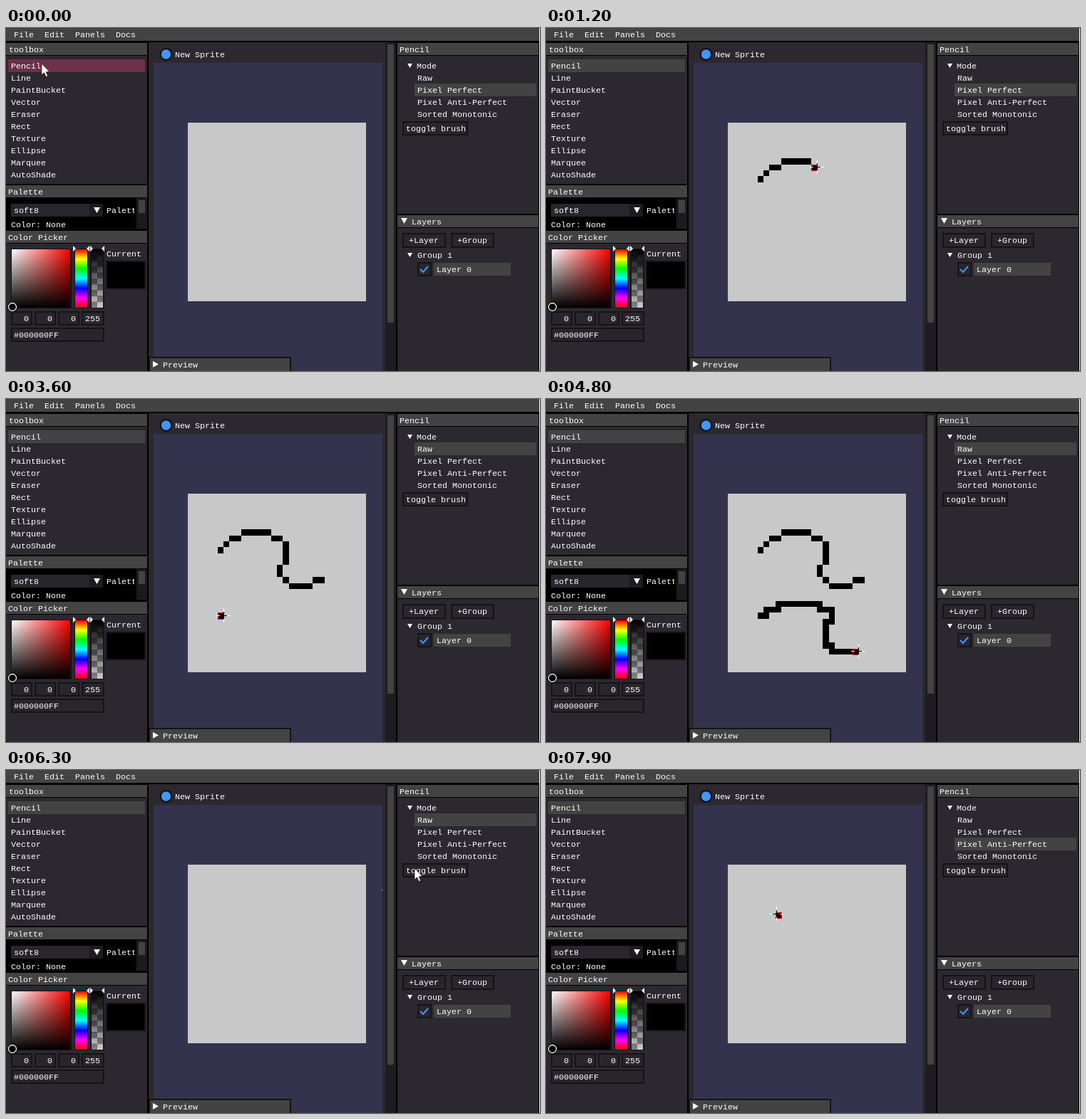
Animation, 749 px wide and 482 px high, one loop 8000 ms. Source, as an HTML page with a canvas:

```html
<!DOCTYPE html>
<html lang="en">
<head>
<meta charset="utf-8">
<title>Sprite editor</title>
<style>
html, body { margin: 0; width: 749px; height: 482px; overflow: hidden; background: #000; }
canvas { display: block; }
</style>
</head>
<body>
<canvas id="stage" width="749" height="482"></canvas>
<script>
const ctx = document.getElementById('stage').getContext('2d');
const LOOP = 8000, STEP = 100;
const PANEL = '#2b282f', BAR = '#434343', HOVER = '#6d3048', EDGE = '#151317', WHITE = '#fff';
const VIEW = { x: 207, y: 49, w: 321, h: 433 };
const SHEET = { x: 255, y: 133, w: 250, h: 251, n: 30 };
const TOOLS = ['Pencil', 'Line', 'PaintBucket', 'Vector', 'Eraser', 'Rect', 'Texture', 'Ellipse', 'Marquee', 'AutoShade'];
const MODES = ['Raw', 'Pixel Perfect', 'Pixel Anti-Perfect', 'Sorted Monotonic'];

// Free pointer moves: time, x, y. While a stroke is drawn the pointer follows it.
const POINTER = [
  [100, 50, 50], [400, 262, 170], [600, 341, 217], [800, 300, 212],
  [1800, 438, 256], [1900, 438, 256], [2300, 580, 122], [2400, 587, 110], [2600, 587, 110], [2700, 588, 68],
  [2800, 588, 68], [3000, 520, 150], [3300, 325, 334], [3500, 295, 315],
  [5500, 486, 330], [5900, 524, 213], [6000, 524, 213], [6200, 537, 168], [6300, 573, 138],
  [6500, 592, 110], [6900, 594, 104], [7300, 440, 165], [7600, 335, 202], [7900, 323, 202]
];

// Corner cells of each stroke
const SMOOTH = walk([[5, 9], [7, 7], [8, 7], [9, 6], [13, 6], [14, 7], [15, 7], [16, 8], [16, 11], [15, 12],
  [15, 13], [17, 15], [20, 15], [21, 14], [22, 14]]);
const STEPPED = walk([[5, 20], [6, 20], [6, 19], [8, 19], [8, 18], [15, 18], [15, 19], [17, 19], [17, 21], [16, 21],
  [16, 25], [17, 25], [17, 26], [24, 26], [24, 25], [25, 25], [25, 24], [27, 24], [27, 23]]);

// count: time, number of cells drawn
const STROKES = [
  { cells: SMOOTH, from: 1000, done: 1800, gone: 6100, count: [[1000, 2], [1200, 10], [1800, 24]] },
  { cells: STEPPED, from: 3600, done: 5500, gone: 5600, count: [[3600, 1], [3700, 4], [4600, 25], [4800, 29], [5500, 38]] }
];

const HOVERED = [[0, 'Pencil'], [200, ''], [2300, 'Sorted Monotonic'], [2700, 'Raw'], [2900, ''],
  [6400, 'Sorted Monotonic'], [6500, 'Pixel Anti-Perfect'], [7100, '']];
const CHOSEN = [[0, 'Pixel Perfect'], [2900, 'Raw'], [7000, 'Pixel Anti-Perfect']];

function walk(corners) {
  const cells = [corners[0]];
  for (const [c, r] of corners.slice(1)) {
    let [x, y] = cells[cells.length - 1];
    while (x !== c || y !== r) {
      x += Math.sign(c - x);
      y += Math.sign(r - y);
      cells.push([x, y]);
    }
  }
  return cells;
}

function tween(keys, t) {
  if (t <= keys[0][0]) return keys[0].slice(1);
  const i = keys.findIndex(k => k[0] >= t);
  if (i < 0) return keys[keys.length - 1].slice(1);
  const a = keys[i - 1], b = keys[i], f = (t - a[0]) / (b[0] - a[0]);
  return a.slice(1).map((v, j) => v + (b[j + 1] - v) * f);
}

const current = (list, t) => list.filter(e => e[0] <= t).pop()[1];
const drawn = (stroke, t) => stroke.cells.slice(0, Math.round(tween(stroke.count, t)[0]));

function pointerAt(t) {
  const stroke = STROKES.find(s => t >= s.from && t < s.done);
  if (stroke) {
    const [c, r] = drawn(stroke, t).pop();
    return [Math.round(SHEET.x + (c + 0.95) * SHEET.w / SHEET.n), Math.round(SHEET.y + (r + 0.45) * SHEET.h / SHEET.n)];
  }
  // rest before pressing the button
  return tween(POINTER, t > 800 && t < 1000 ? 800 : t).map(Math.round);
}

function rect(x, y, w, h, color) {
  ctx.fillStyle = color;
  ctx.fillRect(x, y, w, h);
}

function frame(x, y, w, h, fill = '#28252b') {
  rect(x, y, w, h, EDGE);
  rect(x + 2, y + 2, w - 4, h - 4, fill);
}

function poly(color, ...pts) {
  ctx.beginPath();
  pts.forEach(p => ctx.lineTo(p[0], p[1]));
  ctx.closePath();
  ctx.fillStyle = color;
  ctx.fill();
}

function text(s, x, baseline) {
  ctx.fillStyle = WHITE;
  ctx.fillText(s, x, baseline);
}

function disc(x, y, r, fill, stroke, width) {
  ctx.beginPath();
  ctx.arc(x, y, r, 0, Math.PI * 2);
  if (fill) { ctx.fillStyle = fill; ctx.fill(); }
  if (stroke) { ctx.strokeStyle = stroke; ctx.lineWidth = width; ctx.stroke(); }
}

function gradient(x, y, w, h, dx, dy, colors) {
  const g = ctx.createLinearGradient(x, y, x + dx, y + dy);
  colors.forEach((c, i) => g.addColorStop(i / (colors.length - 1), c));
  rect(x, y, w, h, g);
}

const down = (x, y, w, h) => poly(WHITE, [x, y], [x + w, y], [x + w / 2, y + h]);

function title(s, x, y, w, tx = x + 4) {
  rect(x, y - 2, w, 20, '#000');
  rect(x, y, w, 17, BAR);
  text(s, tx, y + 13);
}

function list(items, x, y, w, tx, chosen, hovered) {
  const fill = (name, color) => {
    const i = items.indexOf(name);
    if (i >= 0) rect(x, y + i * 17, w, 18, color);
  };
  fill(chosen, BAR);
  fill(hovered, HOVER);
  items.forEach((s, i) => text(s, tx, y + 13 + i * 17));
}

function drawPicker() {
  rect(7, 310, 85, 84, EDGE);
  gradient(8, 311, 82, 82, 82, 0, ['#fff', '#f00']);
  gradient(8, 311, 82, 82, 0, 82, ['rgba(0,0,0,0)', '#000']);
  rect(96, 310, 19, 84, EDGE);
  gradient(97, 311, 17, 82, 0, 82, ['#f00', '#ff0', '#0f0', '#0ff', '#00f', '#f0f', '#f00']);
  rect(118, 310, 20, 84, EDGE);
  for (let r = 0; r < 10; r++)
    for (let c = 0; c < 2; c++)
      rect(120 + c * 8, 311 + r * 8.2, 8, 8.2, (r + c) % 2 ? '#808080' : '#cccccc');
  gradient(120, 311, 16, 82, 0, 82, ['#000', 'rgba(0,0,0,0)']);
  for (const [x, dir] of [[94, 1], [117, -1], [118, 1], [138, -1]])
    poly(WHITE, [x, 306], [x + 4 * dir, 310], [x, 314]);
  disc(9, 392, 5.5, '#000', '#000', 3);
  disc(9, 392, 5.5, null, WHITE, 1.3);
  text('Current', 141, 321);
  frame(140, 327, 56, 40, '#000');
  ['0', '0', '0', '255'].forEach((s, i) => {
    frame(7 + i * 33, 398, i === 3 ? 32 : 30, 20);
    text(s, i === 3 ? 111 : 25 + i * 33, 412);
  });
  frame(7, 421, 131, 20);
  text('#000000FF', 11, 435);
}

function drawLeft(hovered) {
  rect(0, 20, 198, 462, PANEL);
  title('toolbox', 0, 21, 198);
  list(TOOLS, 3, 44, 192, 7, 'Pencil', hovered);
  title('Palette', 0, 221, 198, 3);
  rect(0, 238, 198, 45, '#000');
  rect(7, 247, 129, 18, '#28252c');
  rect(117, 247, 19, 18, '#1d1b20');
  down(123, 252, 9, 8);
  text('soft8', 11, 260);
  ctx.save();
  ctx.beginPath();
  ctx.rect(0, 238, 180, 44);
  ctx.clip();
  text('Palette', 141, 260);
  text('Color: None', 7, 280);
  ctx.restore();
  rect(183, 239, 15, 43, '#1c1a1e');
  rect(186, 242, 9, 18, BAR);
  title('Color Picker', 0, 285, 198, 3);
  drawPicker();
}

function drawCenter() {
  rect(200, 20, 347, 462, PANEL);
  disc(224.5, 37, 9, '#111');
  disc(224.5, 37, 6.7, '#4296fa');
  text('New Sprite', 237, 41);
  rect(VIEW.x, VIEW.y, VIEW.w, VIEW.h, '#33334d');
  rect(SHEET.x, SHEET.y, SHEET.w, SHEET.h, '#c8c8c8');
  rect(532, 20, 15, 462, '#1e1c20');
  rect(535, 23, 9, 391, BAR);
}

function drawRight(chosen, hovered) {
  rect(549, 20, 198, 462, PANEL);
  title('Pencil', 549, 21, 198, 552);
  down(563, 50, 7, 6);
  text('Mode', 576, 57);
  list(MODES, 573, 61, 171, 577, chosen, hovered);
  frame(556, 131, 92, 20);
  text('toggle brush', 561, 145);
  title('Layers', 549, 263, 198, 569);
  down(554, 267, 9, 8);
  frame(556, 288, 61, 21);
  text('+Layer', 565, 302);
  frame(624, 288, 61, 21);
  text('+Group', 633, 302);
  down(563, 316, 7, 6);
  text('Group 1', 577, 323);
  frame(577, 329, 20, 20);
  ctx.beginPath();
  ctx.moveTo(581, 339);
  ctx.lineTo(585, 343);
  ctx.lineTo(592, 335);
  ctx.strokeStyle = '#4296fa';
  ctx.lineWidth = 2;
  ctx.stroke();
  rect(600, 330, 108, 18, BAR);
  text('Layer 0', 604, 343);
}

function cellBox(c, r) {
  const left = i => Math.round(SHEET.x + i * SHEET.w / SHEET.n);
  const top = i => Math.round(SHEET.y + i * SHEET.h / SHEET.n);
  return [left(c), top(r), left(c + 1) - left(c), top(r + 1) - top(r)];
}

function drawBrush(x, y) {
  const c = Math.floor((x - 1 - SHEET.x) * SHEET.n / SHEET.w);
  const r = Math.floor((y - SHEET.y) * SHEET.n / SHEET.h);
  if (c < 0 || r < 0 || c >= SHEET.n || r >= SHEET.n) return;
  const [bx, by, w, h] = cellBox(c, r);
  rect(bx, by, w + 1, h + 1, '#f00');
  rect(bx + 1, by + 1, w - 1, h - 1, '#000');
}

function drawCross(x, y) {
  for (const [reach, color] of [[10, WHITE], [5, '#000']]) {
    rect(x - reach, y, reach * 2, 1, color);
    rect(x, y - reach, 1, reach * 2, color);
  }
}

function drawArrow(x, y) {
  const pts = [[0, 0], [0, 16], [3.6, 12.8], [6, 18.6], [8.6, 17.5], [6.2, 11.8], [11, 11.5]];
  poly(WHITE, ...pts.map(p => [p[0] + x, p[1] + y]));
  ctx.strokeStyle = '#222';
  ctx.lineWidth = 0.8;
  ctx.stroke();
}

function draw(t) {
  const [x, y] = pointerAt(t);
  const inView = x >= VIEW.x && x < VIEW.x + VIEW.w && y >= VIEW.y;
  const hovered = current(HOVERED, t);

  ctx.font = '11.667px "Liberation Mono", monospace';
  rect(0, 0, 749, 482, '#000');
  rect(0, 0, 748, 18, BAR);
  [['File', 11], ['Edit', 54], ['Panels', 97], ['Docs', 154]].forEach(([s, tx]) => text(s, tx, 13));
  drawLeft(hovered);
  drawCenter();
  drawRight(current(CHOSEN, t), hovered);

  ctx.save();
  ctx.beginPath();
  ctx.rect(VIEW.x, VIEW.y, VIEW.w, VIEW.h);
  ctx.clip();
  for (const s of STROKES)
    if (t >= s.from && t < s.gone)
      drawn(s, t).forEach(cell => rect(...cellBox(...cell), '#000'));
  if (inView) {
    drawBrush(x, y);
    drawCross(x, y);
  } else {
    // the crosshair trails one step behind the arrow
    drawCross(...pointerAt(Math.max(0, t - STEP)));
  }
  ctx.restore();

  frame(200, 462, 200, 22, BAR);
  poly(WHITE, [206, 468], [214, 472.5], [206, 477]);
  text('Preview', 220, 477);
  rect(748, 0, 1, 482, WHITE);
  if (!inView) drawArrow(x, y);
}

const start = performance.now();
function tick() {
  const t = (performance.now() - start) % LOOP;
  draw(Math.floor(t / STEP) * STEP);
  requestAnimationFrame(tick);
}
tick();
</script>
</body>
</html>
```
